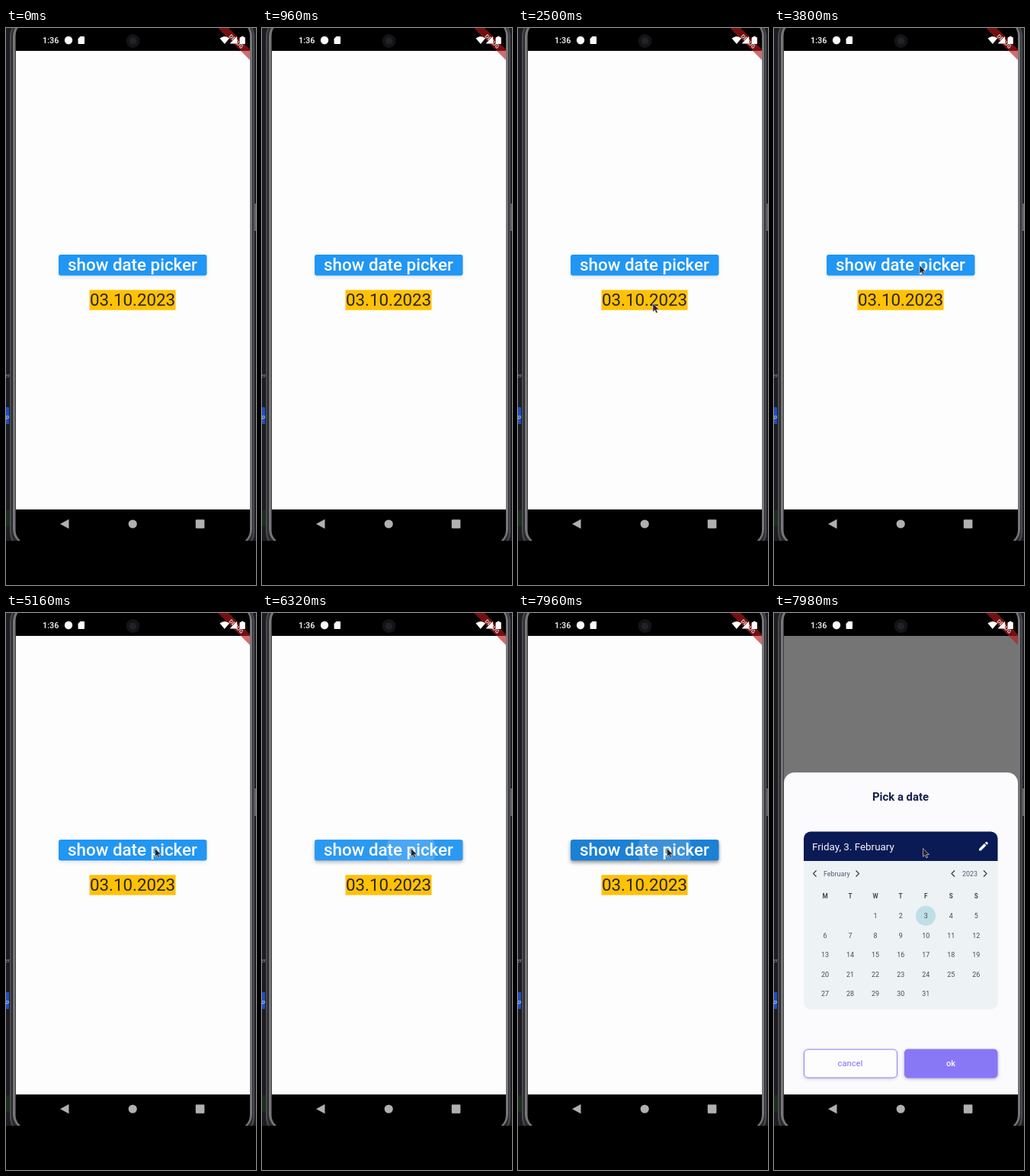
Write an HTML page that moves like this. It is 328 px wide and 730 px high and loops after 8000 ms.

```html
<!DOCTYPE html>
<html lang="en">
<head>
<meta charset="utf-8">
<title>Date picker</title>
<style>
  html, body { margin: 0; width: 100%; height: 100%; overflow: hidden; background: #000; }
  svg { display: block; width: 328px; height: 730px; font-family: Roboto, Arial, sans-serif; }
  .mid { text-anchor: middle; }
  .chev { fill: none; stroke: #34363e; stroke-width: 1.2; }
</style>
</head>
<body>
<svg viewBox="0 0 328 730">
  <defs>
    <clipPath id="btnClip"><rect x="69" y="297" width="194.5" height="27.5" rx="3"/></clipPath>
    <clipPath id="stage"><rect width="328" height="672"/></clipPath>
    <filter id="blur" x="-20%" y="-50%" width="140%" height="200%"><feGaussianBlur stdDeviation="1.9"/></filter>
  </defs>

  <!-- phone body -->
  <g clip-path="url(#stage)">
    <rect width="328" height="672" fill="#1c1c22"/>
    <rect y="632" width="5" height="22" fill="#1b2e22"/>
    <rect y="497" width="4" height="22" fill="#1f50c4"/>
    <text x="0" y="512" font-size="8" fill="#d0d6e4">p</text>
    <text x="-1" y="458" font-size="7" fill="#9a9aa0">er</text>
    <rect x="326" y="230" width="2" height="36" fill="#66666a"/>
    <rect x="5" y="-14" width="321" height="700" rx="25" fill="#4c4c50"/>
    <rect x="7" y="-12" width="317" height="696" rx="23" fill="#2a2a2d"/>
    <rect x="9" y="-10" width="314" height="688" rx="21" fill="#77777a"/>
    <rect x="12.5" y="-8" width="307.500" height="684" rx="18" fill="#000"/>
  </g>
  <rect x="13" y="30" width="307" height="601" fill="#fdfdfe"/>

  <!-- first page -->
  <g id="home">
    <rect id="shadow" x="68.500" y="299.500" width="195.500" height="28" rx="4" fill="#444" filter="url(#blur)"/>
    <rect id="btn" x="69" y="297" width="194.5" height="27.5" rx="3"/>
    <circle id="ripple" fill="#fff" fill-opacity=".14" clip-path="url(#btnClip)"/>
    <text class="mid" x="166" y="318.4" font-size="22.35" font-weight="500" fill="#fdfdfe">show date picker</text>
    <rect x="109.500" y="343.3" width="113" height="26.4" fill="#ffc107"/>
    <text class="mid" x="166" y="364.3" font-size="22.35" fill="#2b2620">03.10.2023</text>
  </g>

  <!-- bottom sheet -->
  <g id="sheet">
    <rect x="13" y="30" width="307" height="200" fill="#757575"/>
    <path d="M13 631V223a14 14 0 0 1 14-14H306a14 14 0 0 1 14 14V631Z" fill="#fbfbfd"/>
    <text class="mid" x="166" y="246" font-size="14.9" font-weight="700" fill="#16204c">Pick a date</text>
    <rect x="39" y="286.5" width="254.5" height="233" rx="9" fill="#edf2f5"/>
    <path d="M39 325V295.5a9 9 0 0 1 9-9H284.5a9 9 0 0 1 9 9V325Z" fill="#0a1a55"/>
    <text x="50" y="311" font-size="13.4" fill="#f4f5fa">Friday, 3. February</text>
    <path d="M269 311.5V309l7-7 2.5 2.5-7 7ZM276.8 301.2l1.3-1.3q.6-.5 1.2 0l1.3 1.3q.5.6 0 1.2l-1.3 1.3Z" fill="#fbfbfd"/>
    <g font-size="8.94" fill="#565a72">
      <text x="65" y="344.6">February</text>
      <text x="247" y="344.6">2023</text>
    </g>
    <path class="chev" d="M55.5 337.5l-4 4 4 4M107.5 337.5l4 4-4 4M237 337.5l-4 4 4 4M275 337.5l4 4-4 4"/>
    <circle cx="199" cy="396.8" r="13" fill="#bfdfe7"/>
    <g id="days" class="mid" fill="#454a5c"></g>
    <rect x="39" y="573" width="122.5" height="37.5" rx="5" fill="#a6a2c8" filter="url(#blur)" opacity=".6"/>
    <rect x="171" y="573" width="122.5" height="37.5" rx="5" fill="#8a84b8" filter="url(#blur)" opacity=".7"/>
    <rect x="39.5" y="572" width="122" height="37" rx="5" fill="#fdfdfe" stroke="#8f80f0"/>
    <rect x="171" y="571.5" width="122.5" height="38" rx="5" fill="#8878f6"/>
    <g class="mid" font-size="11.2" font-weight="500">
      <text x="100" y="594.3" fill="#9a8af4">cancel</text>
      <text x="232" y="594.3" fill="#fbfbfd">ok</text>
    </g>
  </g>

  <!-- system bars -->
  <path d="M278 0H292L320 28V42Z" fill="#b71c1c" fill-opacity=".63"/>
  <text class="mid" transform="translate(302 17.500) rotate(45)" y="2.5" font-size="7.2" font-weight="700" fill="#e6d4d4">DEBUG</text>
  <circle cx="166.5" cy="17" r="9" fill="#141417"/>
  <circle cx="166.5" cy="17" r="4.5" fill="#232327"/>
  <g fill="#fbfbfd">
    <text x="48" y="20" font-size="10.8" font-weight="500">1:36</text>
    <circle cx="82" cy="16" r="5.2"/>
    <path d="M97.5 11H102q1 0 1 1v8q0 1-1 1H95.5q-1 0-1-1V14Z"/>
    <path d="M280.5 13.5q6.3-5 12.6 0L286.8 21Z"/>
    <path d="M303 11V20.5H293.5Z"/>
    <path d="M308.7 12V10.8h3V12h1.3q.8 0 .8.8v7.4q0 .8-.8.8h-5.6q-.8 0-.8-.8v-7.4q0-.8.8-.8Z"/>
  </g>
  <g fill="#b0b0b2">
    <path d="M71 650L82.5 643.8V656.2Z"/>
    <circle cx="166.2" cy="650" r="5.6"/>
    <rect x="248.8" y="644.3" width="11.6" height="11.4" rx="1"/>
  </g>

  <path id="cursor" d="M0 0V11L2.6 8.7 4.3 12.5 6.2 11.7 4.6 8H8Z" fill="#26262a" stroke="#cfcfd4" stroke-width=".7"/>
</svg>
<script>
  const LOOP = 8000, PRESS = 6290, OPEN = 7980;
  const $ = id => document.getElementById(id);
  const clamp = v => Math.min(1, Math.max(0, v));
  const mix = (a, b, p) => a + (b - a) * p;
  const attrs = (id, o) => { for (const k in o) $(id).setAttribute(k, o[k]); };

  // calendar grid
  const cell = (text, col, y, style) => `<text x="${67 + col * 33.05}" y="${y}" ${style}>${text}</text>`;
  let grid = '';
  [...'MTWTFSS'].forEach((d, i) => grid += cell(d, i, 374, 'font-size="8.2" font-weight="700"'));
  for (let d = 1; d <= 31; d++) {
    const n = d + 1;
    grid += cell(d, n % 7, 400 + Math.floor(n / 7) * 25.55, 'font-size="8.94"');
  }
  $('days').innerHTML = grid;

  // pointer path: time, x, y
  const path = [[1960, 212, 552], [2440, 177, 361], [2920, 177, 361],
                [3660, 191, 312], [3800, 191, 311], [4500, 195.5, 308.5]];
  function pointer(t) {
    const i = path.findIndex(p => p[0] > t);
    if (i < 0) return path[path.length - 1].slice(1);
    const [t0, x0, y0] = path[i - 1], [t1, x1, y1] = path[i];
    const p = (t - t0) / (t1 - t0);
    return [mix(x0, x1, p), mix(y0, y1, p)];
  }

  function draw(t) {
    const open = t >= OPEN, pressed = t >= PRESS;
    const p = clamp((t - PRESS) / (7860 - PRESS));
    $('home').style.display = open ? 'none' : '';
    $('sheet').style.display = open ? '' : 'none';

    const from = pressed ? [43, 154, 243] : [33, 150, 243];
    const rgb = from.map((c, i) => Math.round(mix(c, [28, 128, 212][i], p)));
    attrs('btn', { fill: `rgb(${rgb})` });
    attrs('shadow', { opacity: pressed ? mix(.3, .5, p) : .1 });
    attrs('ripple', { cx: mix(195.5, 192.5, p), cy: 311, r: pressed ? mix(32.5, 35.5, p) : 0 });

    const seen = t >= path[0][0];
    $('cursor').style.display = seen ? '' : 'none';
    if (seen) attrs('cursor', { transform: `translate(${pointer(t)})` });
  }

  const start = performance.now();
  function tick() {
    draw((performance.now() - start) % LOOP);
    requestAnimationFrame(tick);
  }
  tick();
</script>
</body>
</html>
```
